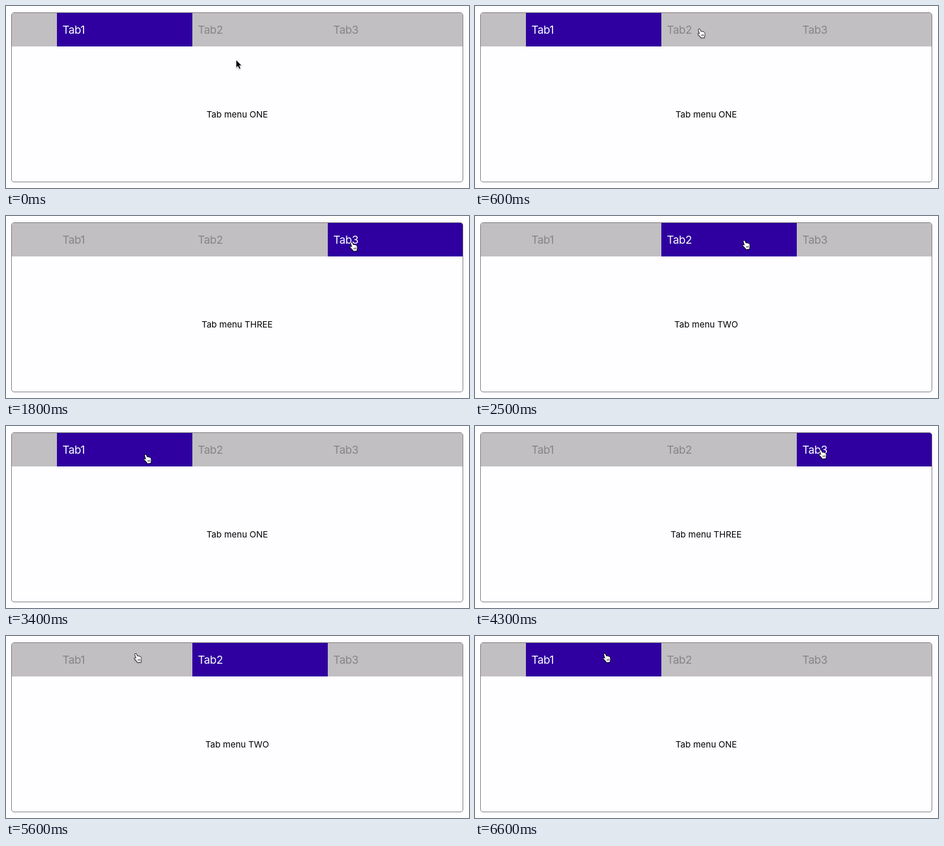
These frames come from a looping animation (800x315 px, 7700 ms). An HTML page with a canvas:

```html
<!DOCTYPE html>
<html lang="en">
<head>
<meta charset="utf-8">
<title>Tabs</title>
<style>
  html, body { margin: 0; width: 100%; height: 100%; overflow: hidden; background: #fefdff; }
  body { position: relative; font-family: Inter, "Open Sans", sans-serif; }
  #panel {
    position: absolute; left: 9px; top: 11px; width: 781px; height: 294px;
    box-sizing: border-box; border: 1px solid #777577; border-radius: 5px; overflow: hidden;
  }
  #bar { position: absolute; left: 0; top: 0; width: 100%; height: 58px; background: #c1bfc1; }
  .tab {
    position: absolute; top: 0; width: 234px; height: 58px; padding-left: 9.5px;
    box-sizing: border-box; font-size: 19px; letter-spacing: -0.4px; line-height: 59px; color: #868486;
  }
  .tab.on { background: #2f009f; color: #fff; }
  #text {
    position: absolute; left: 0; right: 0; top: 165px; text-align: center;
    font-size: 15px; line-height: 22px; color: #000;
  }
  canvas { position: absolute; left: 0; top: 0; }
</style>
</head>
<body>
<div id="panel">
  <div id="bar"></div>
  <div id="text"></div>
</div>
<canvas id="stage" width="800" height="315"></canvas>
<script>
const LOOP = 7700, STEP = 100;
const words = ["ONE", "TWO", "THREE"];

// [time, selected tab]
const clicks = [[0, 0], [700, 1], [1700, 2], [2500, 1], [3400, 0], [4200, 2], [4900, 1], [5800, 0]];

// [time, x, y] of the pointer's hot spot
const path = [
  [100, 398, 94], [200, 395, 80], [300, 388, 51], [400, 387, 40],
  [500, 387, 40], [800, 388, 41],
  [1000, 388, 41], [1200, 446, 43], [1400, 560, 46], [1600, 596, 46], [1800, 597, 46],
  [2000, 597, 46], [2100, 560, 40], [2200, 496, 38], [2300, 465, 43],
  [2700, 465, 43], [2800, 410, 53], [2900, 330, 59], [3000, 262, 54], [3100, 241, 50],
  [3500, 241, 50], [3700, 320, 50], [3900, 510, 44], [4100, 594, 41], [4300, 597, 42],
  [4500, 560, 44], [4700, 470, 44], [4900, 447, 43], [5100, 446, 42],
  [5200, 415, 41], [5300, 346, 37], [5400, 270, 33], [5500, 232, 31], [5600, 224, 31]
];

const ctx = document.getElementById("stage").getContext("2d");
const text = document.getElementById("text");
const bar = document.getElementById("bar");
const tabs = words.map((_, i) => {
  const tab = document.createElement("div");
  tab.textContent = "Tab" + (i + 1);
  tab.style.left = 78 + 234 * i + "px";
  bar.append(tab);
  return tab;
});

const arrow = new Path2D("M0 0V12.2L2.8 9.6L5 14.6L7 13.7L4.8 8.8H8.6Z");
const hand = new Path2D(
  "M1.5 2.2C1.1 .7 3 .1 3.7 1.4L5.3 5.2C5.9 4.5 7 4.6 7.4 5.4C8.1 4.8 9 5 9.4 5.9" +
  "C10.3 5.5 11.3 6 11.6 7.2C12.1 9 12.4 10.4 11.7 12.4L11.5 15L5.9 15.5L5.1 14" +
  "C3.7 12.6 2.4 11.2 .9 9.6C.1 8.6 1.1 7.7 2.2 8.2L3.7 9.3Z");
const creases = new Path2D("M6.4 10L7 13M8.2 9.8L8.7 12.8M10 9.5L10.3 12.5");

function pointAt(t) {
  const i = path.findIndex(p => p[0] > t);
  if (i === 0) return path[0].slice(1);
  if (i < 0) return path[path.length - 1].slice(1);
  const [t0, x0, y0] = path[i - 1], [t1, x1, y1] = path[i];
  const k = (t - t0) / (t1 - t0);
  return [x0 + (x1 - x0) * k, y0 + (y1 - y0) * k];
}

function shape(outline, fill, stroke, width) {
  ctx.save();
  ctx.shadowColor = "rgba(0,0,0,.35)";
  ctx.shadowBlur = 2;
  ctx.shadowOffsetY = 1;
  ctx.lineWidth = width;
  ctx.strokeStyle = stroke;
  ctx.stroke(outline);
  ctx.restore();
  ctx.fillStyle = fill;
  ctx.fill(outline);
}

function drawPointer(x, y) {
  ctx.clearRect(0, 0, 800, 315);
  ctx.save();
  ctx.lineJoin = "round";
  if (y > 70) {
    ctx.translate(x, y);
    shape(arrow, "#000", "#fff", 1.6);
  } else {
    ctx.translate(x - 2.5, y - 1);
    shape(hand, "#fff", "#000", 1.5);
    ctx.lineWidth = 0.7;
    ctx.strokeStyle = "#000";
    ctx.stroke(creases);
  }
  ctx.restore();
}

let shown = -1;
function select(n) {
  if (n === shown) return;
  shown = n;
  tabs.forEach((tab, i) => tab.className = i === n ? "tab on" : "tab");
  text.textContent = "Tab menu " + words[n];
}

function frame() {
  const t = Math.floor(performance.now() % LOOP / STEP) * STEP;
  select(clicks.filter(c => c[0] <= t).pop()[1]);
  drawPointer(...pointAt(t));
  requestAnimationFrame(frame);
}
frame();
</script>
</body>
</html>
```
